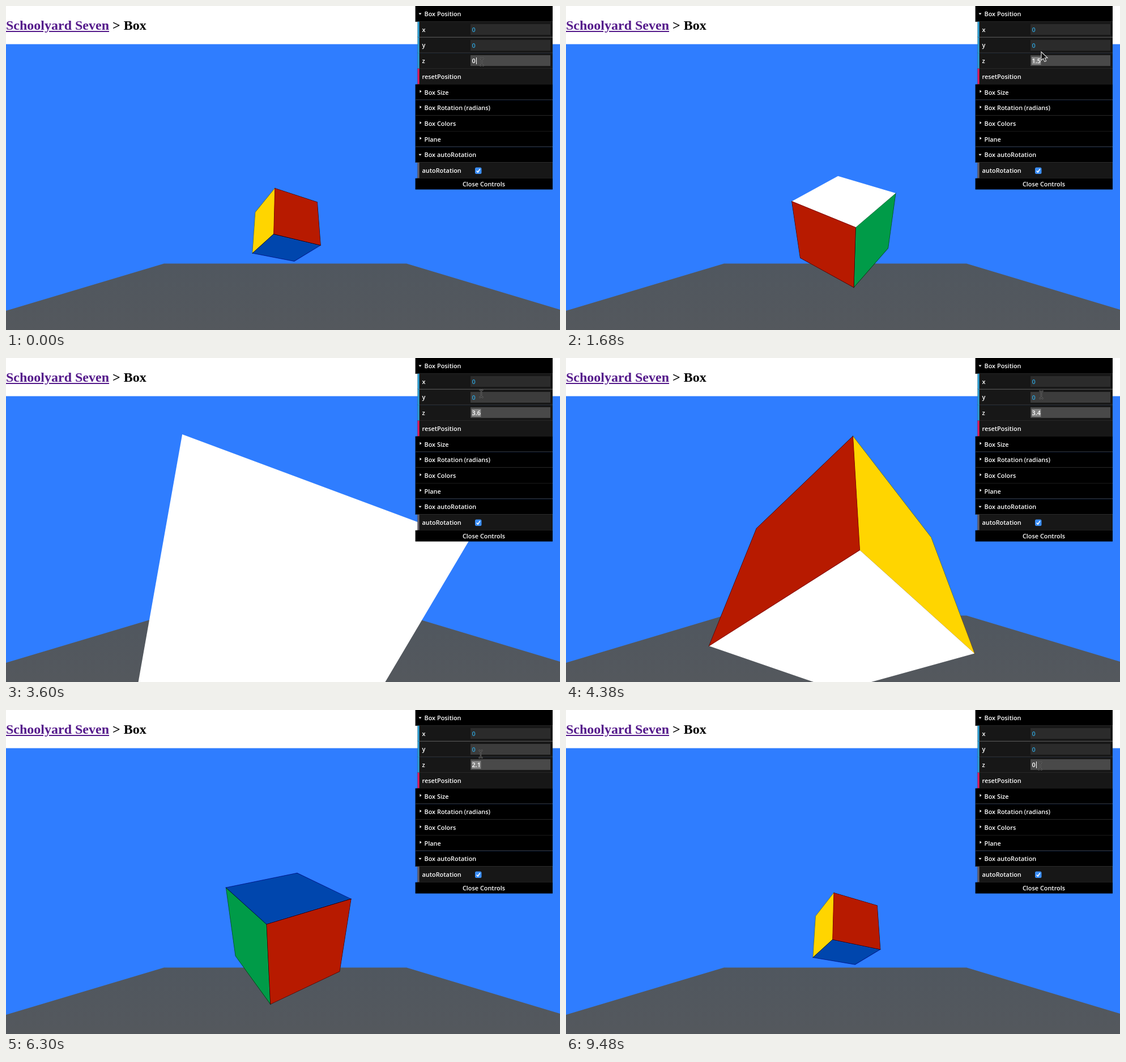
Recreate the animation shown at these times as an HTML page with a canvas. Size 978 px wide and 573 px high, loop 9540 ms.

```html
<!DOCTYPE html>
<html lang="en">
<head>
<meta charset="utf-8">
<title>Box</title>
<style>
  html, body { margin: 0; width: 100%; height: 100%; overflow: hidden; background: #fff; }
  canvas { position: absolute; left: 0; top: 0; display: block; }
  h1 {
    position: absolute; left: 0; top: 20px; margin: 0; white-space: pre;
    font: bold 24px/28px "Liberation Serif", "Times New Roman", serif; color: #000;
  }
  h1 u { color: #551a8b; }
  h1 span { position: absolute; left: 188px; top: 0; }
</style>
</head>
<body>
<canvas id="stage" width="978" height="573"></canvas>
<h1><u>Schoolyard Seven</u><span>&gt; Box</span></h1>
<script>
const ctx = document.getElementById('stage').getContext('2d');
const W = 978, H = 573, TOP = 67.5;
const LOOP = 9540, STEP = 60;
const CX = 493, CY = 391.5, FOCAL = 421.5, CAMERA_Z = 5;
const START_ANGLE = 2.645, SPIN = 0.03995;
const PANEL = { x: 722.6, w: 242.4, row: 27.7, gap: 4 };
const FONT = '600 10.9px "Open Sans", "Noto Sans", sans-serif';
const BLUE = '#2fa1d6', FIELD = '#2b2b2b';

const mix = (a, b, u) => a + (b - a) * u;
const progress = (t, from, to) => Math.min(1, Math.max(0, (t - from) / (to - from)));
const easeInOut = u => (1 - Math.cos(Math.PI * u)) / 2;
const easeOut = u => 1 - (1 - u) ** 2;

// The box is dragged near, drifts back a little, then is pushed away.
function boxZ(t) {
  const z = t < 3400 ? mix(0, 3.6, easeInOut(progress(t, 300, 3400)))
    : t < 5770 ? mix(3.6, 3.05, progress(t, 3400, 5770))
    : mix(3.05, 0, easeOut(progress(t, 5770, 8900)));
  return Math.round(z * 10) / 10;
}

function rect(x, y, w, h, color) {
  ctx.fillStyle = color;
  ctx.fillRect(x, y, w, h);
}

function trace(points) {
  ctx.beginPath();
  points.forEach(([x, y]) => ctx.lineTo(x, y));
}

function polygon(points, color) {
  trace(points);
  ctx.closePath();
  ctx.fillStyle = color;
  ctx.fill();
}

function stroke(color, width) {
  ctx.strokeStyle = color;
  ctx.lineWidth = width;
  ctx.stroke();
}

function text(str, x, y, color = '#fff') {
  ctx.fillStyle = color;
  ctx.fillText(str, x, y + 4);
}

function drawScene() {
  rect(0, 0, W, H, '#fff');
  rect(0, TOP, W, H - TOP, '#2f7dff');
  const ground = ctx.createLinearGradient(0, 456, 0, H);
  ground.addColorStop(0, '#50575f');
  ground.addColorStop(1, '#54585d');
  polygon([[279, 455.5], [707, 455.5], [W, 537], [W, H], [0, H], [0, 539]], ground);
}

function drawBox(angle, z) {
  const s = Math.sin(angle), c = Math.cos(angle);
  // Local axes after equal turns about x and y
  const axes = [[c, s * s, -c * s], [0, c, s], [s, -s * c, c * c]];
  const colors = [['#ffd500', '#009b48'], ['#0046ad', '#ffffff'], ['#b71a00', '#ff5800']];
  const square = [[1, 1], [1, -1], [-1, -1], [-1, 1]];
  const project = ([x, y, depth]) => {
    const k = FOCAL / (CAMERA_Z - z - depth);
    return [CX + x * k, CY - y * k];
  };
  ctx.save();
  ctx.beginPath();
  ctx.rect(0, TOP, W, H - TOP);
  ctx.clip();
  axes.forEach((axis, i) => [1, -1].forEach((side, j) => {
    if (side * axis[2] * (CAMERA_Z - z) <= 0.5) return;
    const u = axes[(i + 1) % 3], v = axes[(i + 2) % 3];
    polygon(square.map(([p, q]) =>
      project(axis.map((n, k) => (side * n + p * u[k] + q * v[k]) / 2))), colors[i][j]);
    // Multiplied rims darken coloured edges and leave white ones alone
    ctx.globalCompositeOperation = 'multiply';
    stroke(colors[i][j], 0.9);
    ctx.globalCompositeOperation = 'source-over';
  }));
  ctx.restore();
}

function drawBar(y, color) {
  rect(PANEL.x, y, PANEL.w, PANEL.row, color);
}

function drawTitle(index, label, open) {
  const y = index * PANEL.row + 14;
  drawBar(y - 14, '#000');
  polygon(open ? [[728.5, y - 1.5], [733.5, y - 1.5], [731, y + 1.5]]
               : [[730.5, y - 4], [733.5, y - 1.5], [730.5, y + 1]], '#fff');
  text(label, 738.5, y);
  rect(PANEL.x, Math.round(y - 14 + PANEL.row) - 1, PANEL.w, 1, '#2c2c2c');
}

// Rows leave a gap on the left through which the page shows.
function drawRow(index, label, mark) {
  const x = PANEL.x + PANEL.gap, y = index * PANEL.row, w = PANEL.w - PANEL.gap;
  rect(x, y, w, PANEL.row, '#171717');
  rect(x, Math.round(y + PANEL.row) - 1, w, 1, '#2c2c2c');
  rect(x, y, 3, PANEL.row, mark);
  text(label, 734.5, y + 14);
}

function drawField(index, value, color, back) {
  const y = Math.round(index * PANEL.row + 4.3);
  rect(820, y, 141, 19, back);
  text(value, 822.5, y + 9.7, color);
}

function drawValue(value, selected) {
  const width = ctx.measureText(value).width;
  drawField(3, '', '#fff', '#494949');
  if (selected) rect(822, 90, width + 1, 14, '#828282');
  else rect(Math.round(823.5 + width), 91, 1, 12, '#fff');
  text(value, 822.5, 97);
}

function drawPanel(z, mouseY) {
  const overY = mouseY >= 60 && mouseY <= 79;
  ctx.font = FONT;
  drawTitle(0, 'Box Position', true);
  ['x', 'y', 'z'].forEach((name, i) => drawRow(i + 1, name, BLUE));
  drawRow(4, 'resetPosition', '#e61d5f');
  ['Box Size', 'Box Rotation (radians)', 'Box Colors', 'Plane']
    .forEach((label, i) => drawTitle(i + 5, label, false));
  drawTitle(9, 'Box autoRotation', true);
  drawRow(10, 'autoRotation', '#66606a');

  drawField(1, '0', BLUE, FIELD);
  drawField(2, '0', BLUE, overY ? '#3c3c3c' : FIELD);
  drawValue(String(z), mouseY < 88);

  ctx.beginPath();
  ctx.roundRect(828, 285.5, 11.5, 11.5, 2.5);
  ctx.fillStyle = '#3b8ef6';
  ctx.fill();
  trace([[830.8, 291.5], [833, 294], [836.8, 288.3]]);
  stroke('#fff', 1.6);

  rect(PANEL.x, 11 * PANEL.row, PANEL.w, 19.8, '#000');
  ctx.textAlign = 'center';
  text('Close Controls', 843.5, 315);
  ctx.textAlign = 'left';
}

function drawArrow(x, y) {
  const outline = [[0, 0], [0, 15], [3.5, 11.8], [6, 17.3], [8.6, 16.2], [6.2, 10.8], [11, 10.8]];
  polygon(outline.map(([dx, dy]) => [x + dx, y + dy]), '#111');
  ctx.closePath();
  stroke('#e8e8e8', 1.1);
}

function drawBeam(x, y) {
  for (const [color, width] of [['#7c7c7c', 2.4], ['#1c1c1c', 1]]) {
    trace([[x, y - 6], [x, y + 6]]);
    stroke(color, width);
    for (const end of [-1, 1]) {
      trace([[x - 3.5, y + 7 * end], [x, y + 5.5 * end], [x + 3.5, y + 7 * end]]);
      stroke(color, width);
    }
  }
}

function draw(now) {
  const frame = Math.floor((now % LOOP) / STEP), t = frame * STEP;
  const z = boxZ(t);
  const mouseX = Math.round(mix(840, 837, t / LOOP)), mouseY = Math.round(99 - z * 10);
  drawScene();
  drawBox(START_ANGLE + SPIN * frame, z);
  drawPanel(z, mouseY);
  // Between two fields the pointer is an arrow
  if (mouseY > 79 && mouseY < 88) drawArrow(mouseX, mouseY - 3);
  else drawBeam(mouseX, mouseY);
}

const start = performance.now();
function tick() {
  draw(performance.now() - start);
  requestAnimationFrame(tick);
}
tick();
</script>
</body>
</html>
```
